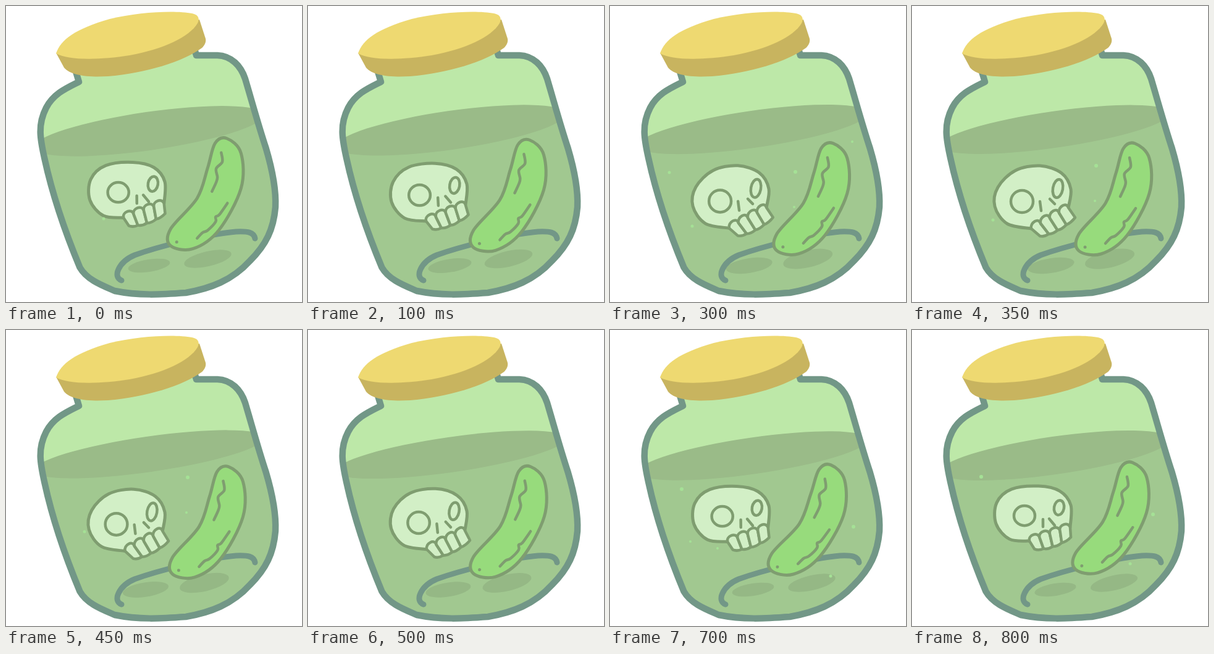
An HTML page with a canvas that plays this animation: 479 px wide and 480 px high, repeating every 0.85 s.

```html
<!DOCTYPE html>
<html lang="en">
<head>
<meta charset="utf-8">
<title>Pickle jar</title>
<style>
html, body { margin: 0; width: 100%; height: 100%; overflow: hidden; background: #fff; }
canvas { display: block; width: 479px; height: 480px; }
</style>
</head>
<body>
<canvas id="stage" width="479" height="480"></canvas>
<script>
const ctx = document.getElementById('stage').getContext('2d');
const STEP = 50, STEPS = 17;
const COLOR = {
  glass: '#729787', air: '#bde8a8', liquid: '#a1c890', surface: '#9abb88',
  shadow: '#95b885', line: '#7f9d70', bone: '#d2efc6', pickle: '#97db7c',
  bubble: '#a5e196', lid: '#eed971', rim: '#c8b45f'
};

// The skull swings between a high and a low pose.
// head: outline from left jaw to right jaw; teeth: ends of the lower row.
const HIGH = {
  head: [190,342, 158,339, 136,314, 137,280, 161,258, 205,253, 239,261, 257,284, 256,320],
  eyes: [182,301,17,16, 238,288,8,12],
  nose: [212,319,212,307, 231,317,222,306],
  teeth: [198,355,257,336]
};
const LOW = {
  head: [193,361, 154,353, 134,325, 139,294, 167,267, 207,259, 242,271, 257,297, 253,327],
  eyes: [178,317,18,18, 236,296,8,15],
  nose: [209,332,207,317, 231,321,223,313],
  teeth: [207,373,264,343]
};

const PICKLE = [357,214, 380,238, 380,295, 344,363, 302,393, 266,388, 266,361, 309,311, 326,262, 338,222];
// Wrinkles as (distance along, distance aside) pairs between two ends.
const WRINKLE_A = [0,0, .22,.08, .42,-.03, .62,.05, .75,.05, 1,0];
const WRINKLE_B = [0,0, .3,.03, .39,0, .47,.07, .72,.06, .83,.01, 1,0];

// x, y, first step, number of steps.
const BUBBLES = [
  [134,363,12,3], [100,290,4,3], [398,339,12,5], [396,240,4,3], [361,419,12,5],
  [300,269,6,4], [298,326,6,4], [137,377,4,6], [120,278,12,5], [178,374,12,3], [158,345,0,1]
];

const JAR = new Path2D('M112 103 L118 123 C98 133 77 142 65 165 C51 192 55 215 62.5 248 ' +
  'C76 310 95 365 119.5 424 C131 444 155 453 176 462 C215 470 250 468 291 465 ' +
  'C331 458 366 445 395 413 C421 387 433 362 436 326 C437.5 295 430 262 420.5 230 ' +
  'C408 192 398 155 387 118 C380 97 365 81 342 80 L308 80 L304 66');
const FLOOR = new Path2D('M187 445 C172 440 182 415 208 404 C244 391 320 371 372 366 C392 365 401 367 403 377');
const RIM = new Path2D('M81 76 L94 100 C104 112 130 116 165 114 C226 109 287 90 317 68 C322 63 324 58 323 53 L313 22 Z');
const LID = new Path2D('M81 77 C88 55 112 37 168 21 C216 9 275 7 301 12 C311 14 314 20 310 28 C297 50 255 70 200 80 C150 88 100 88 81 77 Z');

const mix = (a, b, k) => a + (b - a) * k;
const mixAll = (a, b, k) => a.map((v, i) => mix(v, b[i], k));
// Periodic wave that peaks at the given step.
const wave = (step, peak) => Math.cos(2 * Math.PI * (step - peak) / STEPS);

// Smooth curve through a flat list of points.
function spline(flat, closed) {
  const n = flat.length / 2, path = new Path2D();
  const at = i => {
    const j = closed ? (i + n) % n : Math.min(n - 1, Math.max(0, i));
    return [flat[2 * j], flat[2 * j + 1]];
  };
  path.moveTo(...at(0));
  for (let i = 0; i < (closed ? n : n - 1); i++) {
    const [a, b, c, d] = [at(i - 1), at(i), at(i + 1), at(i + 2)];
    path.bezierCurveTo(
      b[0] + (c[0] - a[0]) / 6, b[1] + (c[1] - a[1]) / 6,
      c[0] - (d[0] - b[0]) / 6, c[1] - (d[1] - b[1]) / 6, c[0], c[1]);
  }
  if (closed) path.closePath();
  return path;
}

function oval(x, y, rx, ry, deg = 0) {
  const path = new Path2D();
  path.ellipse(x, y, rx, ry, deg * Math.PI / 180, 0, 2 * Math.PI);
  return path;
}

function fill(path, color) {
  ctx.fillStyle = color;
  ctx.fill(path);
}

function stroke(path, color = COLOR.line, width = 4.5) {
  ctx.strokeStyle = color;
  ctx.lineWidth = width;
  ctx.stroke(path);
}

function drawLiquid(step) {
  ctx.save();
  ctx.clip(JAR);
  ctx.translate(231, 202 + 2 * wave(step, 14));
  ctx.rotate(-8.2 * Math.PI / 180);
  ctx.fillStyle = COLOR.liquid;
  ctx.fillRect(-300, 0, 600, 400);
  fill(oval(0, 0, 188, 30 - 1.5 * wave(step, 10.5)), COLOR.surface);
  ctx.restore();
}

function drawShadows(sink) {
  fill(oval(232 - 7 * sink, 421, 34 + 4 * sink, 10 + 2 * sink, -9), COLOR.shadow);
  fill(oval(327 - 7 * sink, 410, 39 + 2 * sink, 12 + 2 * sink, -13), COLOR.shadow);
}

function drawTeeth(head, [x0, y0, x1, y1]) {
  const [jx0, jy0] = head, [jx1, jy1] = head.slice(-2);
  const low = (k, drop = 0) => [mix(x0, x1, k), mix(y0, y1, k) + 22 * k * (1 - k) + drop];
  const top = (k, rise = 0) => [mix(jx0, jx1, k) - rise / 4, mix(jy0, jy1, k) - rise];
  for (let i = 0; i < 4; i++) {
    const a = i / 4, b = (i + 1) / 4, path = new Path2D();
    path.moveTo(...low(a));
    path.lineTo(...top(a));
    path.bezierCurveTo(...top(a, 10), ...top(b, 10), ...top(b));
    path.lineTo(...low(b));
    path.quadraticCurveTo(...low((a + b) / 2, 3), ...low(a));
    fill(path, COLOR.bone);
    stroke(path);
  }
}

function drawSkull(sink) {
  const [head, eyes, nose, teeth] = ['head', 'eyes', 'nose', 'teeth']
    .map(part => mixAll(HIGH[part], LOW[part], sink));
  const outline = spline(head);
  fill(outline, COLOR.bone);
  stroke(outline, COLOR.line, 5);
  drawTeeth(head, teeth);
  stroke(oval(...eyes.slice(0, 4)));
  stroke(oval(...eyes.slice(4), 10));
  for (const i of [0, 4]) stroke(spline(nose.slice(i, i + 4)));
}

function drawWrinkle(x0, y0, x1, y1, shape) {
  const dx = x1 - x0, dy = y1 - y0, flat = [];
  for (let i = 0; i < shape.length; i += 2) {
    const [k, side] = [shape[i], shape[i + 1]];
    flat.push(x0 + dx * k + dy * side, y0 + dy * k - dx * side);
  }
  stroke(spline(flat));
}

// Sinks with the skull and tips over a little on the way back up.
function drawPickle(step, sink) {
  const tip = Math.max(0, wave(step, 13)) ** 2, body = spline(PICKLE, true);
  ctx.save();
  ctx.translate(360 + 4 * sink, 220 + 9 * sink + 5 * tip);
  ctx.rotate(2.2 * tip * Math.PI / 180);
  ctx.translate(-360, -220);
  fill(body, COLOR.pickle);
  stroke(body, COLOR.line, 5);
  drawWrinkle(348, 237, 333, 300, WRINKLE_A);
  drawWrinkle(358, 319, 309, 376, WRINKLE_B);
  fill(oval(276, 382, 2.5, 2.5), COLOR.line);
  ctx.restore();
}

function drawBubbles(step) {
  BUBBLES.forEach(([x, y, birth, life], i) => {
    const age = step - birth, r = 2 + i % 3 / 2;
    if (age >= 0 && age < life) fill(oval(x - 2 * age, y - 10 * age, r, r), COLOR.bubble);
  });
}

function draw(step) {
  const sink = (1 + wave(step, 7)) / 2;
  ctx.fillStyle = '#fff';
  ctx.fillRect(0, 0, 479, 480);
  fill(JAR, COLOR.air);
  drawLiquid(step);
  drawShadows(sink);
  stroke(FLOOR, COLOR.glass, 9);
  drawSkull(sink);
  drawPickle(step, sink);
  drawBubbles(step);
  stroke(JAR, COLOR.glass, 10.5);
  fill(RIM, COLOR.rim);
  fill(LID, COLOR.lid);
}

ctx.lineCap = ctx.lineJoin = 'round';
const start = performance.now();
function tick() {
  draw(Math.floor((performance.now() - start) / STEP) % STEPS);
  requestAnimationFrame(tick);
}
tick();
</script>
</body>
</html>
```
